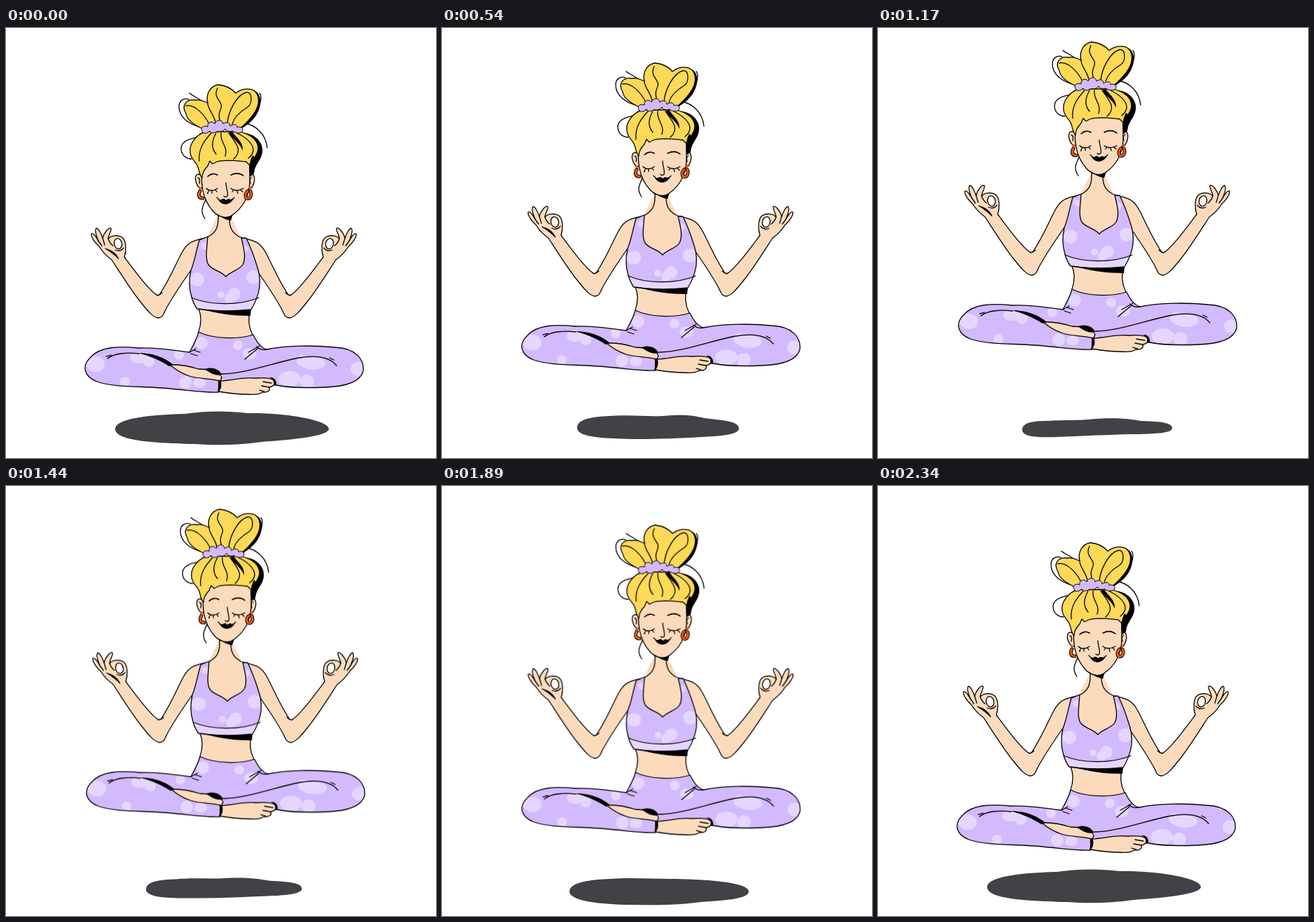
Recreate the animation shown at these times as an HTML page. Size 614 px wide and 614 px high, loop 2430 ms.

```html
<!DOCTYPE html>
<html lang="en">
<head>
<meta charset="utf-8">
<title>Floating meditation</title>
<style>
html, body { margin: 0; width: 100%; height: 100%; overflow: hidden; background: #fff; }
svg { display: block; width: 100vw; height: 100vh; }
path, ellipse, circle { stroke-linecap: round; stroke-linejoin: round; }
.ink { stroke: #000; stroke-width: 1.3; fill: none; }
.skin { fill: #fcdbbd; }
.cloth { fill: #d3b9fd; }
.hair { fill: #fdd957; }
.spots { fill: #e5d6ff; }
.hoop { stroke: #f4560e; stroke-width: 3; fill: none; }
.rim { stroke: #000; stroke-width: 5; fill: none; }
.dot { fill: #f4560e; }

#body { animation: hover 2430ms infinite; }
#shadow { fill: #434046; animation: shade 2430ms infinite; }

@keyframes hover {
  0% { transform: translate(0, 0); animation-timing-function: steps(3); }
  11.111% { transform: translate(0, -18px); animation-timing-function: steps(3); }
  22.222% { transform: translate(1px, -31px); animation-timing-function: steps(3); }
  33.333% { transform: translate(2px, -42px); animation-timing-function: steps(3); }
  44.444% { transform: translate(2px, -57px); animation-timing-function: steps(1); }
  48.148% { transform: translate(2px, -61px); animation-timing-function: steps(5); }
  66.666% { transform: translate(2px, -39px); animation-timing-function: steps(1); }
  70.37% { transform: translate(2px, -34px); animation-timing-function: steps(5); }
  88.888% { transform: translate(0, -12px); animation-timing-function: steps(2); }
  96.296%, 100% { transform: translate(0, 0); }
}
@keyframes shade {
  0% { d: path("M156 572C158 556 215 552 255 551C290 546 320 547 345 550C400 549 460 560 461 572C462 583 410 588 365 591C330 596 300 596 270 594C215 593 154 590 156 572Z"); animation-timing-function: steps(3); }
  11.111% { d: path("M177 571C178 558 215 555 240 556C270 558 290 556 320 558C350 554 443 555 443 571C444 582 400 586 370 587C330 588 310 593 275 591C230 588 178 589 177 571Z"); animation-timing-function: steps(6); }
  33.333% { d: path("M193 571C193 558 215 555 240 554C270 552 290 555 315 554C350 551 360 554 375 557C395 560 424 560 424 572C424 581 395 583 370 584C340 586 310 587 275 587C240 586 193 586 193 571Z"); animation-timing-function: steps(4); }
  48.148% { d: path("M206 574C206 562 225 561 245 561C270 559 290 561 310 558C340 556 360 558 375 561C395 562 420 562 420 571C420 579 395 579 375 580C340 580 310 582 280 583C250 584 206 588 206 574Z"); animation-timing-function: steps(6); }
  70.37% { d: path("M194 578C194 566 218 563 240 562C270 559 290 562 315 562C345 561 360 563 375 566C395 568 425 568 425 579C425 588 395 590 370 591C340 594 310 595 275 594C240 593 194 592 194 578Z"); animation-timing-function: steps(3); }
  81.481% { d: path("M182 579C182 565 215 562 240 561C270 559 300 561 325 561C360 561 438 564 438 579C438 590 400 592 370 594C340 598 310 599 275 598C235 598 182 594 182 579Z"); animation-timing-function: steps(2); }
  88.888% { d: path("M170 573C171 560 215 556 245 556C275 555 295 553 320 554C370 555 449 558 450 573C450 585 405 587 370 590C330 592 310 595 280 593C230 592 170 589 170 573Z"); animation-timing-function: steps(2); }
  96.296%, 100% { d: path("M156 572C158 556 215 552 255 551C290 546 320 547 345 550C400 549 460 560 461 572C462 583 410 588 365 591C330 596 300 596 270 594C215 593 154 590 156 572Z"); }
}
</style>
</head>
<body>
<svg viewBox="0 0 614 614">
<defs>
  <path id="top" d="M276 303C271 320 269 335 264 346C261 360 261 372 265 384C267 392 270 397 273 401C300 405 330 404 350 402C355 394 360 384 362 370C363 360 362 352 360 345C356 332 352 318 343 300L336 300C340 315 343 329 338 338C333 346 321 347 314 355C306 346 296 347 289 338C284 329 287 314 288 298Z"/>
  <path id="pants" d="M275 434C272 446 266 455 262 463C240 460 215 456 190 457C160 454 134 455 121 470C107 483 112 498 130 505C155 514 200 511 235 515C260 517 283 521 303 520L306 505L386 510C405 514 430 514 455 513C485 512 506 505 510 490C512 474 500 457 470 456C440 453 400 453 372 459C363 456 358 448 353 438C330 445 295 444 275 434Z"/>
  <clipPath id="inTop"><use href="#top"/></clipPath>
  <clipPath id="inPants"><use href="#pants"/></clipPath>
  <path id="hoops" d="M277 233C274 238 275 243 281 243M349 233C352 240 348 245 343 243C341 239 342 235 345 233"/>
  <g id="arm" class="ink">
    <path class="skin" d="M303 266C304 284 300 292 289 298C279 302 268 302 260 309C248 319 242 346 219 381L216 382C204 374 187 351 169 327C172 318 172 304 166 299C160 295 150 296 146 301C146 296 151 290 150 286C147 284 140 292 138 300C136 294 132 286 129 286C126 289 129 297 132 304C129 299 125 292 122 294C121 298 127 307 133 312C138 320 144 326 151 331C164 351 179 375 192 391C203 405 210 413 217 414C224 414 225 408 228 402C240 380 252 363 264 346"/>
    <ellipse fill="#fff" cx="160" cy="308" rx="5.5" ry="7.5" transform="rotate(-12 160 308)"/>
    <path d="M132 304L137 311M138 300L141 310M146 301C148 307 150 309 153 311M156 317C161 319 165 318 168 314M215 381C218 382 221 380 223 378"/>
  </g>
</defs>

<path id="shadow" d="M156 572C158 556 215 552 255 551C290 546 320 547 345 550C400 549 460 560 461 572C462 583 410 588 365 591C330 596 300 596 270 594C215 593 154 590 156 572Z"/>

<g id="body">
  <path class="skin" d="M303 262C304 284 300 292 289 298L264 346L275 401C279 412 279 425 275 442L353 442C347 430 345 415 349 403L360 346L333 298C322 292 318 284 319 262Z"/>
  <use href="#arm"/>
  <use href="#arm" transform="translate(622) scale(-1 1)"/>
  <path d="M142 315C149 317 157 320 161 330C156 325 149 319 142 315Z" stroke="#000"/>
  <path class="ink" d="M275 401C280 412 278 425 275 434M349 403C345 415 347 428 352 438"/>

  <use href="#top" class="cloth"/>
  <g class="spots" clip-path="url(#inTop)">
    <circle cx="273" cy="359" r="10"/><circle cx="283" cy="311" r="5"/>
    <circle cx="307" cy="381" r="5"/><circle cx="319" cy="386" r="7"/>
    <circle cx="326" cy="380" r="9"/><circle cx="353" cy="356" r="10"/>
    <circle cx="341" cy="315" r="5"/>
    <path d="M264 383C290 397 335 397 361 384L350 403Q310 406 273 401Z"/>
  </g>
  <use href="#top" class="ink"/>
  <path class="ink" d="M265 385C290 396 333 397 361 385"/>
  <path d="M274 400C300 405 330 404 350 402L349 411C325 411 300 408 274 400Z"/>

  <use href="#pants" class="cloth"/>
  <g class="spots" clip-path="url(#inPants)">
    <ellipse cx="128" cy="480" rx="13" ry="11"/><circle cx="117" cy="474" r="10"/>
    <ellipse cx="189" cy="471" rx="12" ry="8"/><circle cx="204" cy="476" r="8"/>
    <circle cx="170" cy="505" r="7"/><circle cx="256" cy="506" r="9"/>
    <ellipse cx="276" cy="507" rx="9" ry="7"/><circle cx="247" cy="467" r="7"/>
    <circle cx="279" cy="450" r="9"/><circle cx="331" cy="453" r="7"/>
    <ellipse cx="348" cy="465" rx="10" ry="8"/>
    <ellipse cx="438" cy="479" rx="18" ry="9"/><circle cx="423" cy="475" r="8"/>
    <ellipse cx="405" cy="501" rx="16" ry="11"/><circle cx="430" cy="505" r="10"/>
    <circle cx="502" cy="487" r="10"/>
  </g>
  <use href="#pants" class="ink"/>
  <g class="ink">
    <path d="M145 472C155 464 174 463 190 465M150 467L143 469M308 494C345 493 381 478 418 471C442 467 462 470 472 482M468 474L462 471M262 463L271 458M264 465L273 468M268 460L277 463M341 473L359 458M346 463L362 454M358 455C362 459 367 460 372 459"/>
    <path class="skin" d="M234 481C246 480 262 483 275 487C290 487 305 491 308 499L306 504C290 500 275 501 262 497C250 493 241 487 234 481Z"/>
    <path class="skin" d="M305 504C325 503 340 498 355 500C368 499 380 500 383 504C385 509 381 512 376 513C378 518 372 521 366 520C362 523 353 524 343 523C328 523 315 521 303 519Z"/>
    <path d="M365 511L376 513M362 517L369 519M367 505L379 507M306 503C308 509 306 515 303 520"/>
  </g>
  <path d="M189 464C213 464 230 473 239 481L233 483C221 475 205 468 189 464ZM284 487C294 483 305 487 308 495C302 497 294 495 284 487ZM376 499C382 498 387 503 386 510L382 510C384 505 381 501 376 499ZM303 503C306 503 308 506 307 514L303 520Z"/>

  <g class="ink">
    <path d="M262 93C268 98 276 100 281 106M279 142C262 138 247 128 247 112C247 104 254 99 261 102M362 93C366 97 364 104 362 110M340 136C356 138 371 151 373 171M286 157C270 154 250 160 250 172C250 182 258 187 265 187"/>
    <path class="skin" d="M280 211C270 204 269 215 272 222C274 228 278 230 281 228M346 209C357 205 356 218 352 226C350 231 346 230 345 228"/>
    <path d="M274 214C277 214 277 219 276 222M351 213C348 214 348 219 349 222"/>
  </g>
  <path d="M342 150C360 153 370 168 365 182C362 191 355 196 354 208L348 212L346 188ZM350 88C362 90 367 102 361 117C356 130 346 138 334 145Z"/>
  <path class="skin ink" d="M281 190C277 220 279 243 296 262C303 270 315 273 322 268C338 257 346 243 348 222L348 188Z"/>
  <path d="M300 264C308 271 316 272 324 266L321 275C314 274 306 270 300 264Z"/>

  <use href="#hoops" class="rim"/>
  <use href="#hoops" class="hoop"/>
  <circle class="dot" cx="277" cy="229" r="2"/><circle class="dot" cx="349" cy="228" r="2"/>

  <g class="ink">
    <path stroke-width="1.6" d="M288 212C292 208 298 207 302 210M321 210C327 207 334 207 339 211"/>
    <path d="M286 229C290 233 297 233 302 229M290 232L288 235M294 233L294 236M299 231L301 234M321 229C326 233 333 232 339 229M325 231L323 234M330 232L331 236M335 231L338 234"/>
    <path d="M314 221C314 229 318 236 316 240C314 242 312 241 311 240M301 242L305 246M326 242L322 246M285 245C282 254 276 260 284 272"/>
  </g>
  <circle cx="288" cy="236" r="1"/>
  <path d="M303 245C308 246 309 243 312 244L314 246L317 244C319 244 321 246 325 243C322 252 309 256 303 245Z"/>

  <g class="ink">
    <path class="hair" d="M286 148C272 151 261 166 263 178C264 187 270 190 273 196C276 202 275 208 280 214C280 206 284 201 288 197L291 190L295 194L301 191C315 187 330 190 343 191L348 196C351 187 359 184 360 172C360 159 348 152 334 148Z"/>
    <path d="M293 150C284 160 274 172 276 190M300 150C292 164 294 173 300 180M307 150C305 163 318 170 313 183M318 150C330 166 338 176 325 187M330 150C350 160 361 174 346 186"/>
    <path class="hair" d="M281 144C270 139 258 131 257 122C250 111 257 101 270 103C278 101 283 105 288 107C285 95 291 83 303 81C314 82 322 86 328 93C337 86 350 85 356 91C363 98 361 111 356 119C350 130 341 137 333 145Z"/>
    <path d="M257 111C270 108 284 125 290 137M288 107C288 116 298 125 299 135M302 86C294 102 313 105 306 117C303 124 304 130 307 136M316 137C317 119 330 95 343 92C352 90 352 108 345 113C335 119 326 127 323 137"/>
    <path class="cloth" stroke-width="1" d="M281 149C276 144 281 138 288 141C287 134 295 132 298 137C301 130 309 130 310 137C315 133 320 135 320 140C326 136 331 138 330 142C336 139 341 145 336 149C331 151 326 149 323 147C319 149 314 147 313 144C309 150 303 147 301 148C297 151 292 150 291 147C288 150 283 152 281 149Z"/>
  </g>
  <path d="M319 149C321 158 333 162 338 175C339 163 329 157 324 149ZM352 182C357 184 355 196 354 208L349 212C346 202 347 192 352 182Z"/>
</g>
</svg>
</body>
</html>
```
